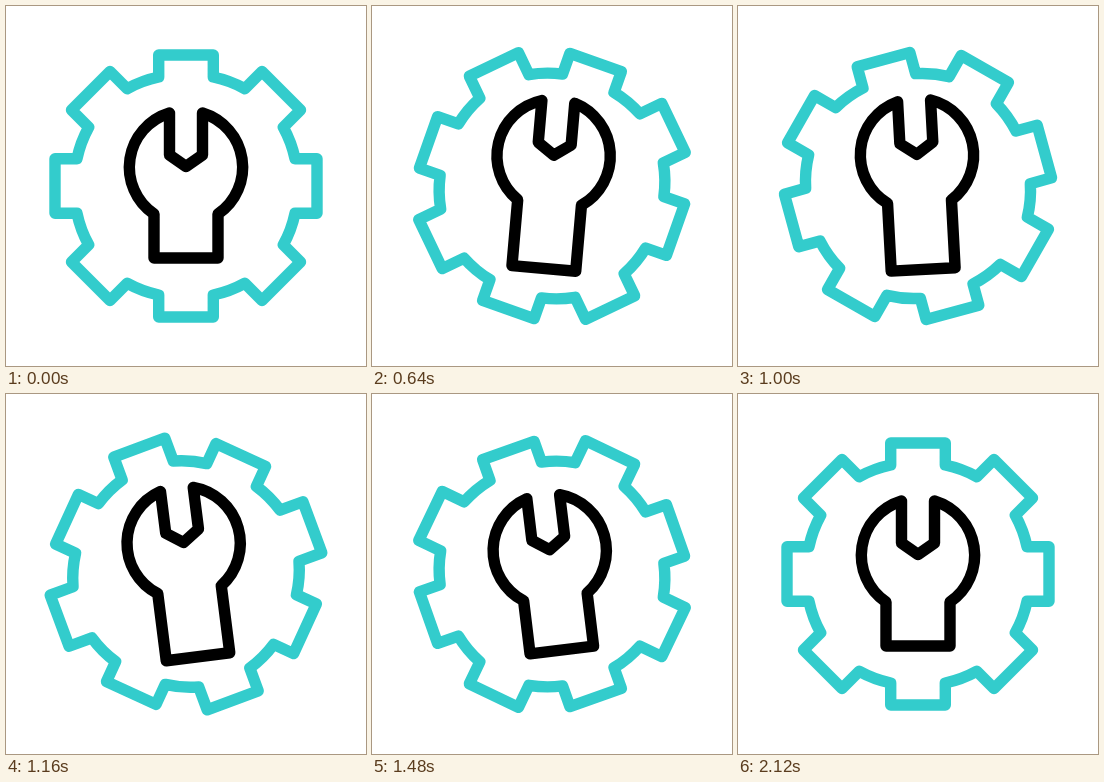
Animation of 360 by 360 pixels, one loop 2160 ms. Source, as an HTML page:

```html
<!DOCTYPE html>
<html lang="en">
<head>
<meta charset="utf-8">
<title>Gear and wrench</title>
<style>
  html, body { margin: 0; width: 100%; height: 100%; overflow: hidden; background: #fff; }
  svg { display: block; width: 100%; height: 100%; }
  path { fill: none; stroke-width: 11.4; stroke-linejoin: round; }
</style>
</head>
<body>
<svg viewBox="-180 -180 360 360">
  <path id="gear" stroke="#33cccc"/>
  <path id="wrench" stroke="#000"/>
</svg>
<script>
const LOOP = 2160, STEP = 40, END = 2120;
const gear = document.getElementById('gear');
const wrench = document.getElementById('wrench');

// One straight tooth and one diagonal tooth, repeated every quarter turn.
const quarter = [[-27.3, -109], [-27.3, -131], [27.3, -131], [27.3, -109],
                 [58.8, -97.3], [76, -114.5], [114.5, -76], [97.3, -58.8]];

function gearPath() {
  let d = '';
  for (let q = 0; q < 4; q++) {
    quarter.forEach(([x, y], i) => {
      for (let k = 0; k < q; k++) [x, y] = [-y, x];
      const join = i % 4 ? 'L' : d ? 'A112.5 112.5 0 0 1 ' : 'M';
      d += `${join}${x} ${y}`;
    });
  }
  return d + 'A112.5 112.5 0 0 1 -27.3 -109Z';
}

// The handle grows by the given length; the head keeps its shape.
function wrenchPath(growth) {
  return `M-16.5 -73V-31L0 -19.5L16.5 -31V-73` +
    `A56.7 56.7 0 0 1 32 28V${72 + growth}H-32V28` +
    `A56.7 56.7 0 0 1 -16.5 -73Z`;
}

// Cubic bezier ease with control points (P, 0) and (1 - P, 1).
const P = 0.672;
function ease(x) {
  if (x <= 0) return 0;
  if (x >= 1) return 1;
  let lo = 0, hi = 1;
  for (let i = 0; i < 24; i++) {
    const u = (lo + hi) / 2, v = 1 - u;
    if (3 * u * v * (v * P + u * (1 - P)) + u * u * u < x) lo = u; else hi = u;
  }
  return lo * lo * (3 - 2 * lo);
}

// Keys are [time, value] pairs.
function tween(t, keys) {
  let value = keys[0][1];
  for (let i = 1; i < keys.length; i++) {
    const [t0, v0] = keys[i - 1], [t1, v1] = keys[i];
    value += (v1 - v0) * ease((t - t0) / (t1 - t0));
  }
  return value;
}

const spin = [[0, 0], [END, 180]];
const swing = [[0, 0], [696, 5], [1248, -7.5], [END, 0]];
const lift = [[130, 0], [810, 12.2], [1090, 12.2], [1820, 0]];

function draw(now) {
  const t = Math.floor((now - start) % LOOP / STEP) * STEP;
  const rise = tween(t, lift);
  gear.setAttribute('transform', `rotate(${tween(t, spin)})`);
  wrench.setAttribute('transform', `translate(0 ${-rise}) rotate(${tween(t, swing)})`);
  wrench.setAttribute('d', wrenchPath(1.95 * rise));
}

function loop() {
  draw(performance.now());
  requestAnimationFrame(loop);
}

gear.setAttribute('d', gearPath());
const start = performance.now();
loop();
</script>
</body>
</html>
```
